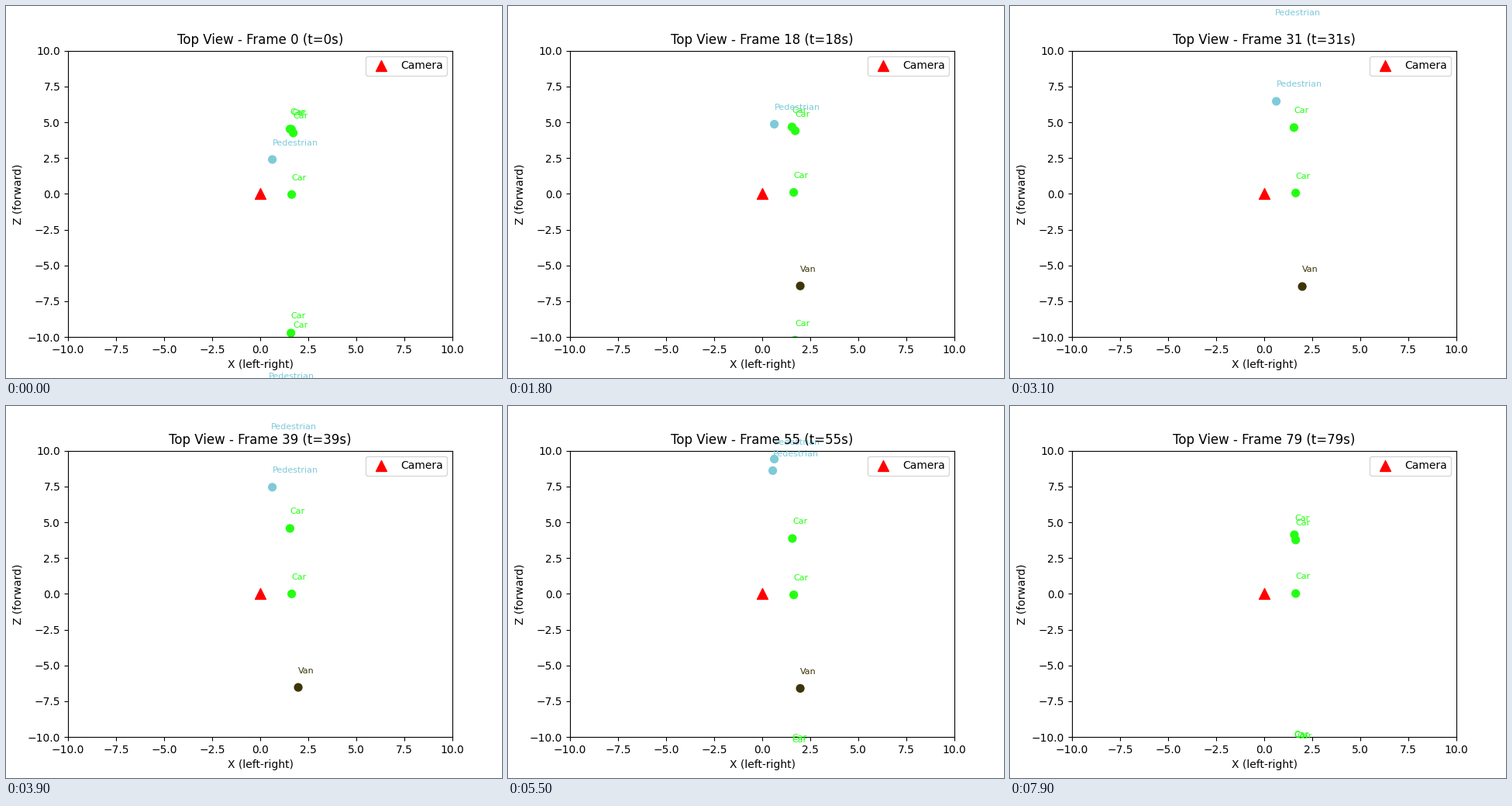
A matplotlib script that plays this animation: 640 by 480 pixels, repeating every 8 s.

```python
import matplotlib.pyplot as plt
import numpy as np
from matplotlib.animation import FuncAnimation

FRAMES = 80
LAST = FRAMES - 1
HIDDEN = -99  # depth far off the stage
COLORS = {"Car": "#24ff12", "Pedestrian": "#7fcad9", "Van": "#3d350a"}

fig, ax = plt.subplots(figsize=(6.4, 4.8), dpi=100)
ax.set(xlim=(-10, 10), ylim=(-10, 10),
       xlabel="X (left-right)", ylabel="Z (forward)")
ax.scatter(0, 0, c="red", marker="^", s=100, label="Camera")
ax.legend(loc="upper right")
title = ax.set_title("")

objects = []


def add(kind, x, path, first=0, last=LAST):
    """Register an object that follows path(t) from first to last."""
    label = ax.text(x, HIDDEN, kind, color=COLORS[kind], fontsize=8)
    objects.append((x, path, first, last, label))


def sway(t):
    """Slow, fading drift shared by all parked vehicles."""
    return 0.13 * np.sin(2 * np.pi * (t - 4) / 70) * np.exp(-t / 90)


def parked(z, gap=0, first=0):
    """Stay near z, closing an initial gap after first."""
    return lambda t: z + gap * np.exp((first - t) / 10) + sway(t)


def walking(z, speed, lag=0):
    return lambda t: z + speed * t - lag * np.exp(-t / 2)


# Vehicles passed early on
add("Car", 1.55, parked(4.57), last=44)
add("Car", 1.63, parked(4.55), last=12)
add("Car", 1.72, parked(4.30), last=23)
add("Car", 1.64, parked(0))
add("Car", 1.60, parked(-9.67), last=12)
add("Car", 1.71, parked(-10.32), last=23)
add("Van", 1.98, parked(-6.53), first=4, last=58)

# Vehicles that turn up later and settle
for x, z, gap in [(1.57, 4.12, -0.5), (1.55, -11.06, -0.65), (1.55, -11.0, -0.33)]:
    add("Car", x, parked(z, gap, 45), first=45)
add("Car", 1.71, parked(-11.12), first=58)
add("Car", 1.64, parked(3.74), first=72)

add("Pedestrian", 0.63, walking(2.65, 0.123, lag=0.25), last=56)
add("Pedestrian", 0.55, walking(15.15, -0.119), first=24, last=59)
add("Pedestrian", 0.42, walking(-13.9, -0.12), last=4)

xs = [obj[0] for obj in objects]
dots = ax.scatter(xs, [HIDDEN] * len(xs), s=50,
                  c=[obj[-1].get_color() for obj in objects])


def draw(t):
    title.set_text(f"Top View - Frame {t} (t={t}s)")
    depths = []
    for x, path, first, last, label in objects:
        z = path(t) if first <= t <= last else HIDDEN
        label.set_position((x, z + 1))
        depths.append(z)
    dots.set_offsets(np.column_stack([xs, depths]))
    return []


anim = FuncAnimation(fig, draw, frames=FRAMES, init_func=lambda: draw(0),
                     interval=100, repeat=True, repeat_delay=0, blit=False)
plt.show()
```
